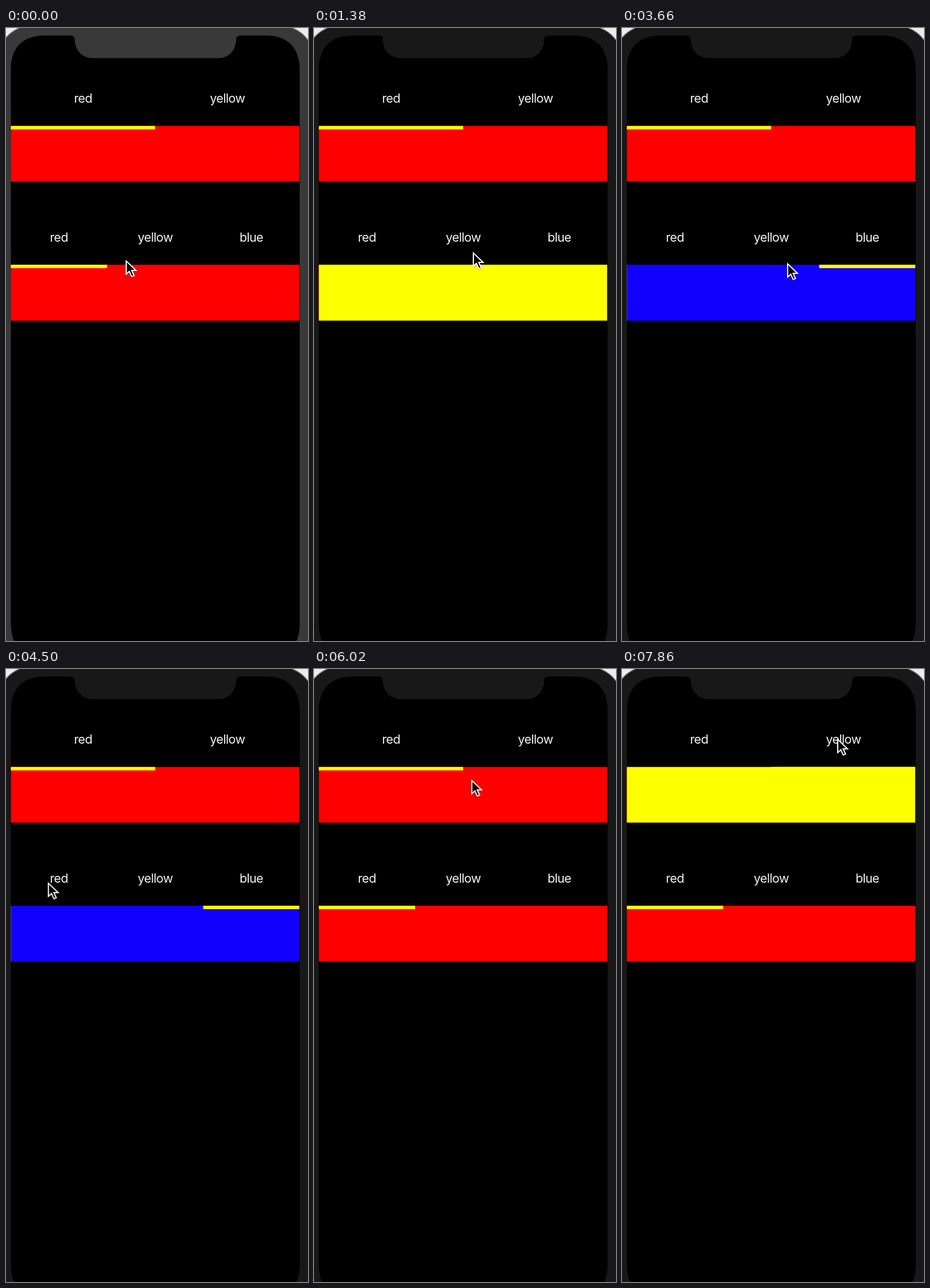
Animation, 525 px wide and 1067 px high, one loop 8000 ms. Source, as an HTML page:

```html
<!DOCTYPE html>
<html lang="en">
<head>
<meta charset="utf-8">
<title>Tab pagers</title>
<style>
  html, body { margin: 0; width: 100%; height: 100%; overflow: hidden; background: #ececec; }
  svg { display: block; width: 525px; height: 1067px; }
  text {
    font: 400 21.5px Inter, "Open Sans", sans-serif;
    letter-spacing: -0.65px;
    text-anchor: middle;
    fill: #f4f4f4;
  }
  .red { fill: #fe0000; }
  .yellow { fill: #fcff00; }
  .blue { fill: #1200ff; }
  .bar { fill: #ffff00; }

  .bezel, .pages, .bar, .cursor { animation: 8s infinite; }
  .bezel { fill: #181818; animation-name: dim; animation-timing-function: step-end; }
  .pages, .bar { animation-timing-function: ease-in-out; }
  .top .pages { animation-name: top-pages; }
  .top .bar { animation-name: top-bar; }
  .low .pages { animation-name: low-pages; }
  .low .bar { animation-name: low-bar; }
  .cursor { animation-name: point; animation-timing-function: ease-in-out; }

  @keyframes dim {
    0% { fill: #393939; }
    0.25%, 100% { fill: #181818; }
  }

  /* each slide takes 350 ms */
  @keyframes top-pages {
    0%, 86.25% { transform: translateX(0); }
    90.625%, 100% { transform: translateX(-501.5px); }
  }
  @keyframes top-bar {
    0%, 86.25% { transform: translateX(0); }
    90.625%, 100% { transform: translateX(250.75px); }
  }
  @keyframes low-pages {
    0%, 11.25% { transform: translateX(0); }
    15.625%, 33% { transform: translateX(-501.5px); }
    37.375%, 60.45% { transform: translateX(-1003px); }
    64.825%, 100% { transform: translateX(0); }
  }
  @keyframes low-bar {
    0%, 11.25% { transform: translateX(0); }
    15.625%, 33% { transform: translateX(167.17px); }
    37.375%, 60.45% { transform: translateX(334.33px); }
    64.825%, 100% { transform: translateX(0); }
  }

  @keyframes point {
    0% { transform: translate(208px, 403px); }
    8.75%, 13% { transform: translate(262px, 374px); }
    17.25% { transform: translate(276px, 389px); }
    20.75% { transform: translate(265px, 388px); }
    30%, 36.5% { transform: translate(424px, 371px); }
    45.75%, 47% { transform: translate(287px, 408px); }
    51.5% { transform: translate(65px, 383px); }
    58%, 67% { transform: translate(74px, 368px); }
    80.5% { transform: translate(364px, 111px); }
    82.5% { transform: translate(367px, 103px); }
    85.5%, 88% { transform: translate(370px, 115px); }
    91%, 100% { transform: translate(374px, 120px); }
  }
</style>
</head>
<body>
<svg viewBox="0 0 525 1067">
  <defs>
    <clipPath id="band"><rect x="8" width="502" height="1067"/></clipPath>
  </defs>

  <rect width="525" height="1067" fill="#ececec"/>
  <path class="bezel" d="M0 17Q9 6 23 0H498Q515 7 525 21V1067H0Z"/>
  <path d="M0 17Q9 6 23 0M498 0Q515 7 525 21" fill="none" stroke="#777" stroke-width="1.5"/>
  <path d="M8.5 72C8.5 34 29 13 68 13H112Q119.5 13 119.5 20C120 39 132 52.5 152 52.5H368
           C388 52.5 399.5 39 400 20Q400 13 407.5 13H451C490 13 510.5 34 510.5 72
           V1036Q510.5 1055 505 1067H14Q8.5 1055 8.5 1036Z"/>

  <g class="top" clip-path="url(#band)">
    <text x="134" y="130">red</text>
    <text x="385" y="130">yellow</text>
    <g class="pages">
      <rect class="red" x="8.5" y="170.5" width="501.5" height="96.9"/>
      <rect class="yellow" x="510" y="170.5" width="501.5" height="96.9"/>
    </g>
    <rect class="bar" x="8.5" y="170.5" width="250.75" height="6"/>
  </g>

  <g class="low" clip-path="url(#band)">
    <text x="92" y="372">red</text>
    <text x="259.5" y="372">yellow</text>
    <text x="426.5" y="372">blue</text>
    <g class="pages">
      <rect class="red" x="8.5" y="412" width="501.5" height="97.4"/>
      <rect class="yellow" x="510" y="412" width="501.5" height="97.4"/>
      <rect class="blue" x="1011.5" y="412" width="501.5" height="97.4"/>
    </g>
    <rect class="bar" x="8.5" y="412" width="167.17" height="6"/>
  </g>

  <g class="cursor">
    <path d="M1 2.5V25.5L6.400 20.6L10.6 29.8L14.6 28.1L10.5 19H18Z"
          fill="#000" stroke="#fff" stroke-width="2"
          style="filter: drop-shadow(0 1px 1px rgba(0, 0, 0, .35))"/>
  </g>
</svg>
</body>
</html>
```
